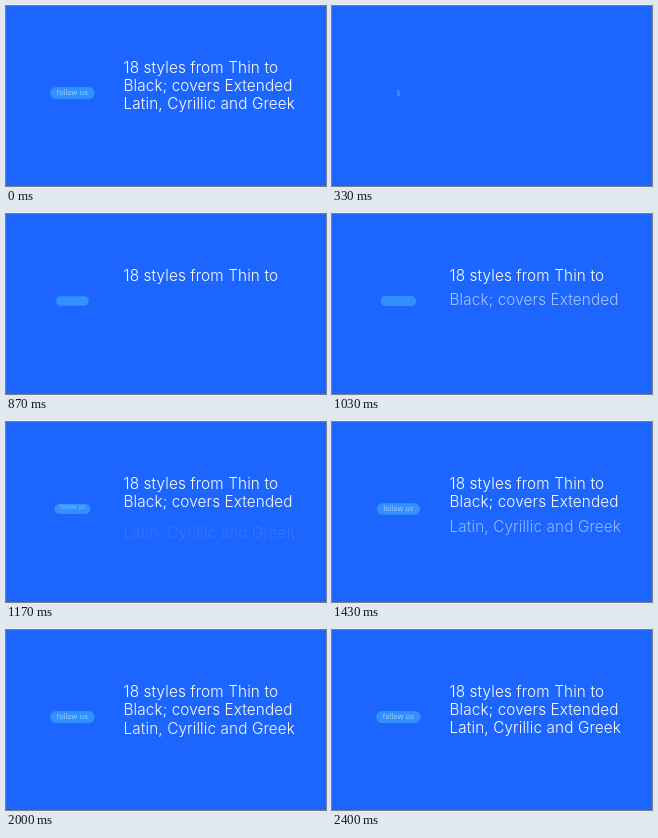
Write an HTML page with a canvas that moves like this. It is 320x180 px and loops after 2.6 s.

```html
<!DOCTYPE html>
<html lang="en">
<head>
<meta charset="utf-8">
<title>Type styles</title>
<style>
  html, body { margin: 0; width: 100%; height: 100%; overflow: hidden; background: #1c66ff; }
  canvas { display: block; width: 320px; height: 180px; }
</style>
</head>
<body>
<canvas id="stage"></canvas>
<script>
const LOOP = 2600;
const RISE = 15;
const canvas = document.getElementById('stage');
const ctx = canvas.getContext('2d');
const ratio = window.devicePixelRatio || 1;
canvas.width = 320 * ratio;
canvas.height = 180 * ratio;

const clamp = v => Math.min(1, Math.max(0, v));
const progress = (t, start, end) => clamp((t - start) / (end - start));
const mix = (a, b, p) => a + (b - a) * p;
const easeInOut = p => p < 0.5 ? 2 * p * p : 1 - 2 * (1 - p) ** 2;
const easeOut = p => 1 - (1 - p) ** 2.7;

const lines = [
  { text: '18 styles from Thin to', y: 67, start: 530, end: 870, ease: easeInOut },
  { text: 'Black; covers Extended', y: 85, start: 840, end: 1180, ease: easeInOut },
  { text: 'Latin, Cyrillic and Greek', y: 103, start: 1120, end: 2400, ease: easeOut }
];

function setType(size, align) {
  ctx.fillStyle = '#fff';
  ctx.font = `300 ${size}px Inter, sans-serif`;
  ctx.letterSpacing = '0.12px';
  ctx.textAlign = align;
}

function drawLine({ text, y, start, end, ease }, t) {
  const p = ease(progress(t, start, end));
  if (p === 0) return;
  ctx.globalAlpha = p;
  setType(15.3, 'left');
  ctx.fillText(text, 117.5, y + RISE * (1 - p));
}

function drawButton(t) {
  const open = easeInOut(progress(t, 570, 950));
  const full = easeInOut(progress(t, 1070, 1570));
  const width = mix(mix(3, 35.5, open), 44.5, full);
  const height = mix(mix(6, 10, open), 12, full);

  ctx.globalAlpha = 1;
  ctx.fillStyle = '#3091ff';
  ctx.beginPath();
  ctx.roundRect(66.4 - width / 2, 87 - height / 2, width, height, mix(0.5, height / 2, open));
  ctx.fill();

  const fade = easeOut(progress(t, 1060, 1360));
  if (fade === 0) return;
  const settle = easeOut(progress(t, 1070, 1600));
  ctx.save();
  ctx.translate(66.4, 87 - 3 * (1 - settle));
  ctx.scale(width / 44.5, width / 44.5);
  ctx.globalAlpha = fade * 0.7;
  setType(7.3, 'center');
  ctx.fillText('follow us', 0, 2.3);
  ctx.restore();
}

function draw(now) {
  const time = now % LOOP;
  const t = time < 30 ? LOOP : time;
  ctx.setTransform(ratio, 0, 0, ratio, 0, 0);
  ctx.globalAlpha = 1;
  ctx.fillStyle = '#1c66ff';
  ctx.fillRect(0, 0, 320, 180);
  if (t >= 330) {
    drawButton(t);
    lines.forEach(line => drawLine(line, t));
  }
}

const origin = performance.now();
function tick() {
  draw(performance.now() - origin);
  requestAnimationFrame(tick);
}
tick();
</script>
</body>
</html>
```
